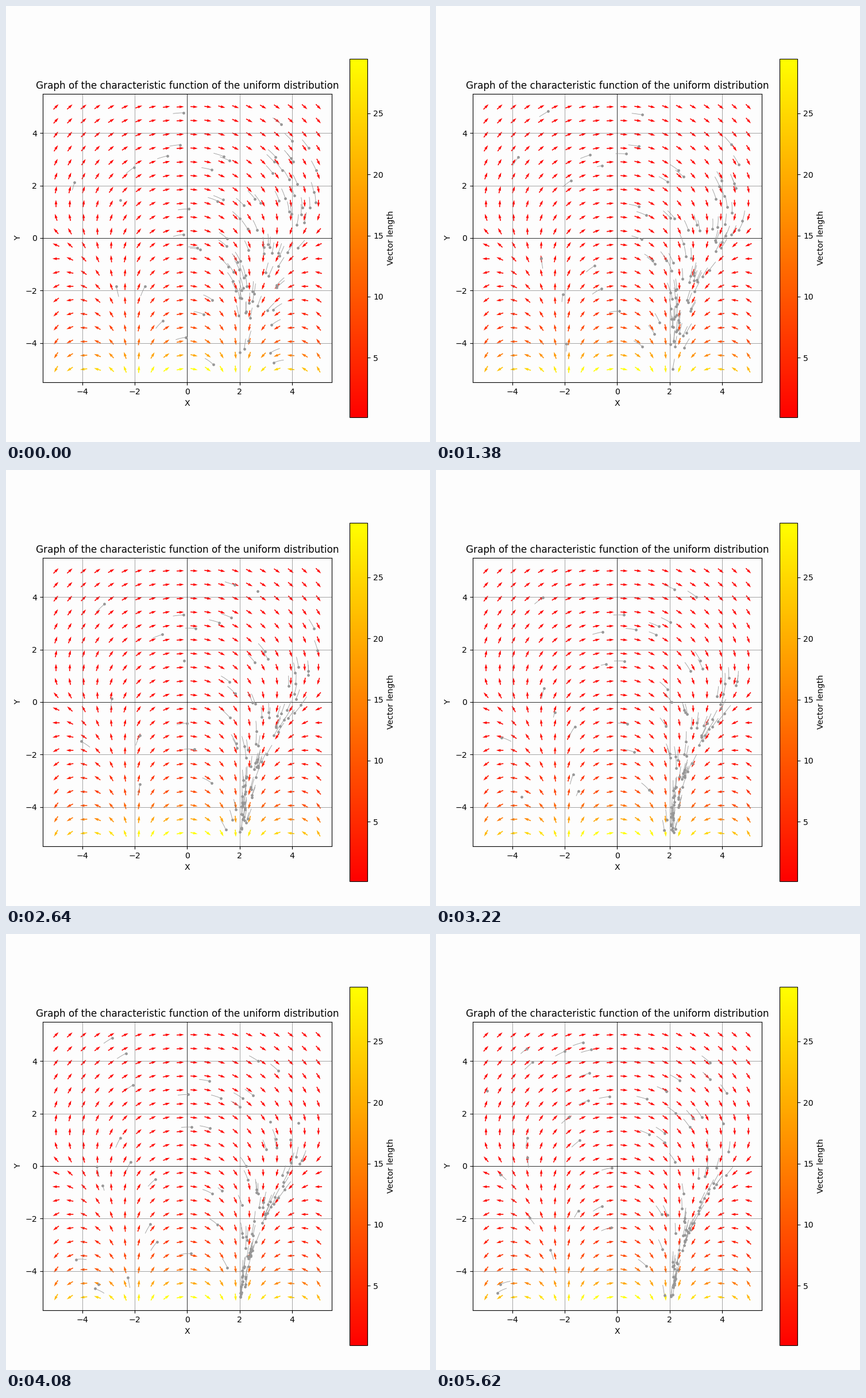
A matplotlib script for the animation above (5.64 s loop, 738 by 759 pixels).

```python
import numpy as np
import matplotlib.pyplot as plt
from matplotlib.animation import FuncAnimation
from matplotlib.collections import LineCollection

W, H, DPI = 738, 759, 101.3
SIDE = 8 * DPI                 # an 8 inch square layout, cropped to W x H
CX, CY = 315.4, H - 403.9      # centre of the plot, measured from bottom left
TICK, LOOP = 20, 5640          # ms
COUNT, STEP, TAIL = 100, 0.1, 4
MOVES, WARM_UP = 41, 12
LIMITS = dict(xlim=(-5.5, 5.5), ylim=(-5.5, 5.5))
GRAY, PAPER = "#979797", "#fdfdfd"


def field(z):
    """Conjugate characteristic function of U(0, 1) at complex z."""
    return np.conj((np.exp(1j * z) - 1) / (1j * z))


def simulate(seed=7):
    """Trails of all particles per move, oldest point first."""
    rng = np.random.default_rng(seed)
    x = 10 * rng.beta(3, 1.5, COUNT) - 5      # most start on the right
    y = rng.uniform(-5, 5, COUNT)
    trail = np.tile(x + 1j * y, (TAIL + 1, 1))
    states = []
    for _ in range(WARM_UP + MOVES + 1):
        states.append(trail)
        f = field(trail[-1])
        head = trail[-1] + STEP * f / abs(f)
        trail = np.vstack([trail[1:], head])
        gone = (abs(head.real) > 5) | (abs(head.imag) > 5)
        fresh = rng.uniform(-5, 5, (2, gone.sum()))
        trail[:, gone] = fresh[0] + 1j * fresh[1]
    paths = np.array(states[WARM_UP:])
    return np.stack([paths.real, paths.imag], axis=-1)


def add_box(left, width, height, **kw):
    """Axes in pixels, centred vertically on the plot."""
    return fig.add_axes([left / W, (CY - height / 2) / H,
                         width / W, height / H], **kw)


def add_plot_box(**kw):
    side = 0.62 * SIDE
    return add_box(CX - side / 2, side, side, **LIMITS, **kw)


def draw_plot():
    ax = add_plot_box(facecolor=PAPER)
    ticks = np.linspace(-5, 5, 20)
    x, y = np.meshgrid(ticks, ticks)
    f = field(x + 1j * y)
    size = abs(f)
    arrows = ax.quiver(x, y, f.real / size, f.imag / size, size,
                       cmap="autumn", pivot="mid", scale=40, width=0.0032)
    ax.grid(color="gray", lw=0.5)
    ax.axhline(0, color="black", lw=0.5)
    ax.axvline(0, color="black", lw=0.5)
    ax.set(xlabel="X", ylabel="Y", title="Graph of the characteristic "
           "function of the uniform distribution")
    bar_left = CX + (0.65875 - 0.31) * SIDE
    bar = add_box(bar_left, 0.77 * SIDE / 20, 0.77 * SIDE)
    fig.colorbar(arrows, cax=bar, label="Vector length")


def freeze():
    """Turn the still plot into a backdrop so frames draw quickly."""
    fig.canvas.draw()
    shot = np.asarray(fig.canvas.buffer_rgba()).copy()
    fig.clear()
    fig.figimage(shot, zorder=-1)


plt.rcParams["font.family"] = "DejaVu Sans"
# The small margin keeps rounding from dropping a pixel
fig = plt.figure(figsize=((W + 1e-6) / DPI, (H + 1e-6) / DPI), dpi=DPI,
                 facecolor=PAPER)
draw_plot()
freeze()

layer = add_plot_box()
layer.axis("off")
tails = layer.add_collection(LineCollection([], colors=GRAY, linewidths=0.6),
                             autolim=False)
dots, = layer.plot([], [], "o", color=GRAY, ms=3.4, mew=0)
trails = simulate()


def update(frame):
    t = frame * TICK
    move = 0 if t < 20 else 1 + (t + 20) // 140
    dots.set_data(*trails[move, -1].T)
    tails.set_segments(trails[move].swapaxes(0, 1))
    return tails, dots


anim = FuncAnimation(fig, update, frames=LOOP // TICK, interval=TICK,
                     repeat=True, repeat_delay=0)
plt.show()
```
